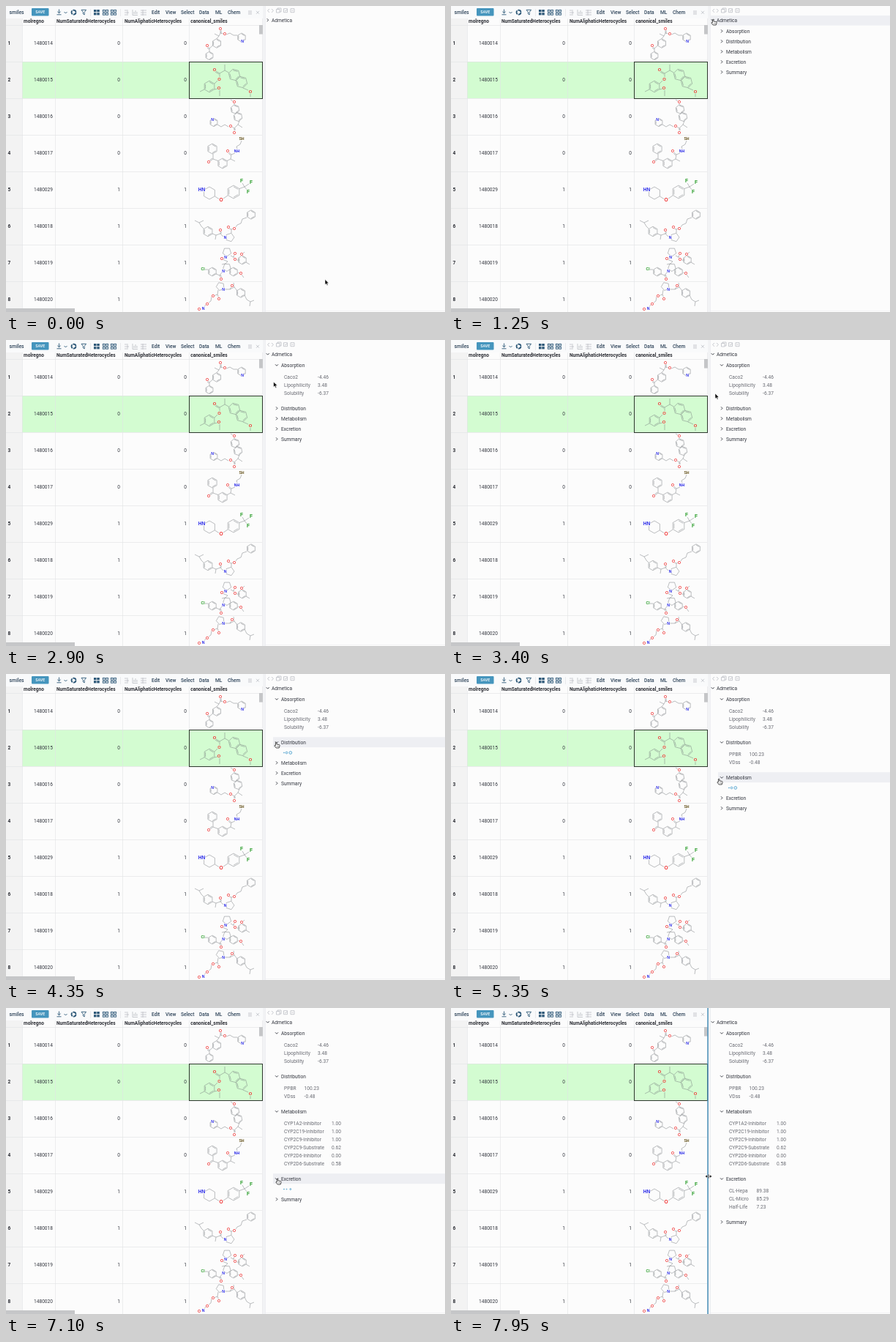
An HTML page that plays this animation: 600 px wide and 418 px high, repeating every 8000 ms.

```html
<!DOCTYPE html>
<html lang="en">
<head>
<meta charset="utf-8">
<title>Molecule table</title>
<style>
html, body { margin: 0; width: 100%; height: 100%; overflow: hidden; background: #fcfcfc; }
svg { display: block; width: 100vw; height: 100vh; }
text { font: 6.6px Roboto, "Open Sans", sans-serif; fill: #33363f; white-space: pre; }
.bold { font-weight: 700; font-size: 6.5px; fill: #2a2c33; }
.menu { font-weight: 500; fill: #2c4258; }
.title { font-size: 6.8px; }
.item { fill: #686a72; letter-spacing: .06px; }
.atom { font: bold 5.2px "Liberation Sans", Arial, sans-serif; text-anchor: middle; paint-order: stroke; stroke-width: 1.4; }
.end { text-anchor: end; }
.bond { fill: none; stroke: #6c7075; stroke-width: .45; stroke-linejoin: round; }
.icon { fill: none; stroke: #2d5878; stroke-width: .9; }
.faint { fill: none; stroke: #bbbec5; stroke-width: .8; }
.chevron { fill: none; stroke: #33363f; stroke-width: .9; }
</style>
</head>
<body>
<svg viewBox="0 0 600 418">
  <g id="table"></g>
  <g id="panel"></g>
  <g id="cursor"></g>
</svg>
<script>
const PAPER = '#fcfcfc', SELECTED = '#d3fcd1', LINE = '#e2e3e5';
const $ = id => document.getElementById(id);
const text = (x, y, s, cls = '') => `<text x="${x}" y="${y}" class="${cls}">${s}</text>`;
const rect = (x, y, w, h, fill, more = '') => `<rect x="${x}" y="${y}" width="${w}" height="${h}" fill="${fill}" ${more}/>`;
const path = (d, cls) => `<path d="${d}" class="${cls}"/>`;

const atomColors = { O: '#f03030', N: '#2828e8', HN: '#2828e8', NH: '#2828e8', F: '#249a24', Cl: '#249a24', SH: '#66531c' };

// Aromatic rings get a second line inside every other edge.
function ring([x, y, r, turn = 30, sides = 6, aromatic = sides === 6]) {
  const point = (i, k) => {
    const a = (turn + i * 360 / sides) * Math.PI / 180;
    return `${(x + k * Math.cos(a)).toFixed(1)},${(y + k * Math.sin(a)).toFixed(1)}`;
  };
  let d = 'M' + Array.from({ length: sides }, (_, i) => point(i, r)).join('L') + 'Z';
  if (aromatic) for (let i = 0; i < sides; i += 2) d += `M${point(i, r * .8)}L${point(i + 1, r * .8)}`;
  return d;
}

function molecule({ rings, bonds, atoms, size = 5.2 }, background) {
  const labels = atoms.split(';').map(a => {
    const [name, x, y] = a.trim().split(' ');
    return `<text class="atom" x="${x}" y="${+y + size * .36}" stroke="${background}" style="font-size:${size}px;fill:${atomColors[name]}">${name}</text>`;
  });
  return path(rings.map(ring).join('') + bonds, 'bond') + labels.join('');
}

const molecules = [
  { rings: [[278, 68, 5.7], [288, 51, 6.3], [322, 43, 6]],
    bonds: 'M278 62V58L282.5 54M278 58L276 56M277.3 59L275 57M288 44.7L291 41L285 38M291 41L293 37V33M294 37V33M293 37L297 38M301 39L306 37L311 40L316 40',
    atoms: 'O 275 54;O 293 31;O 299 38;N 323 48' },
  { rings: [[278, 110, 7.8], [312, 94, 8, 15], [322, 104, 8, 15]], size: 5.8,
    bonds: 'M271 114L265 117M285 114L289 113M292 115V123M285 106L289 102M292 97V92L287 89M291 93L286 90M292 92L299 88V80M299 88L304.5 91M324 112L331 115M334 120V124',
    atoms: 'O 285 87;O 291.5 99.5;O 291 112;O 334 117' },
  { rings: [[313, 141, 6.2, 20], [317, 151.5, 6.2, 20], [284, 159, 5.7]],
    bonds: 'M312 135V133M310 130L307 128M319 157L317 162L323 166M317 162L312 167V170M313 167V170M289 162L294 165L299 162L304 165M309 165L312 167',
    atoms: 'O 312 131;N 282 155;O 307 164;O 312 173' },
  { rings: [[282, 195, 7], [296, 215, 7]],
    bonds: 'M322 184L320 189L315 192L316 195M313 201L308 203L305 200M307 204L304 201M308 203L307 209L313 212M307 209L302 211.5M290 211.5L283 209V202M283 209L279 212M282 208L278 211',
    atoms: 'SH 322 181;NH 315.5 198.5;O 303 198.5;O 277 213' },
  { rings: [[278, 255.5, 8.5, 30, 6, false], [311, 254, 9]], size: 6.6,
    bonds: 'M285.4 260L291 263.5M297 263L303 259M319 249.5L326 247L323 242M326 247L332 243M326 247L330 252',
    atoms: 'HN 267.5 251;O 294 265;F 322 238.5;F 335 241;F 331 254' },
  { rings: [[276, 308, 6.8], [306, 316, 6, 0, 5, false], [335, 285, 6.2]],
    bonds: 'M258 293L264 296L270 293M264 296L267 301L270 304M282 311L287 313L286 319M287 313L293 311V308M294 311V308M293 311L297 315M308 310L308 305L305 304M308 305L311 304M314 302L316 299L321 297L323 291L329 289',
    atoms: 'O 293 306;N 299.5 316;O 304 302;O 312 304.5' },
  { rings: [[302, 336, 6, 90, 5, false], [323, 347, 6], [282, 363, 6], [302, 357, 5.5, 20, 5], [311, 363, 6]],
    bonds: 'M272 360L276 360M287 366L292 368L295 364M292 368L294 372M293 367L295 371M300 352L303 349L298 347M298 347L296 346M307 341L311 343L312 340M311 343L312 346M315 347L318 347M322 340L326 336M328 350L333 353M317 364L320 365M322 367L325 371M300 352L295 353',
    atoms: 'O 295 345.5;N 300 343.5;O 313 338.5;O 313 346;O 322 339;Cl 269 359;N 297 362;O 321 365;O 294 373' },
  { rings: [[293, 383, 5.7, 30, 5, false], [321, 392, 6.3]],
    bonds: 'M298 387L306 387L308 384M306 387L312 384L311 378M312 384L316 389M326 395L329 401L334 404L333 410M334 404L339 402M290 388L289 394L284 396M289 394L291 399M281 397L280 403L276 406M273 408L271 411',
    atoms: 'N 297 387;O 309 382;O 283 396.5;O 291 400;O 275 407;N 269.5 413.5;O 264 414' }
];

function drawTable() {
  const ids = [1480014, 1480015, 1480016, 1480017, 1480029, 1480018, 1480019, 1480020];
  const columns = [22, 67, 159, 250, 350];
  let out = rect(0, 0, 351, 17, '#f9fafb') + rect(0, 76, 350, 50, SELECTED) + rect(0, 17, 22, 401, '#f3f3f3');
  out += rect(0, 26, 350, .6, LINE);
  columns.forEach(x => out += rect(x, 17, .6, 401, LINE));
  ids.forEach((id, i) => {
    const y = 53.4 + 50 * i, count = i < 4 ? 0 : 1;
    out += rect(0, 76 + 50 * i, 350, .6, LINE) + text(2.5, y, i + 1, 'bold') +
      text(64, y, id, 'end') + text(156, y, count, 'end') + text(247, y, count, 'end') +
      molecule(molecules[i], i === 1 ? SELECTED : PAPER);
  });
  out += rect(250.5, 76.5, 100, 50, 'none', 'stroke="#2f382f" stroke-width="1"');
  out += text(24, 23.2, 'molregno', 'bold') + text(69, 23.2, 'NumSaturatedHeterocycles', 'bold') +
    text(162, 23.2, 'NumAliphaticHeterocycles', 'bold') + text(252.3, 23.2, 'canonical_smiles', 'bold');
  out += rect(346, 26, 5, 12.5, '#c5c6c8') + rect(0, 413, 94, 5, '#c5c6c8');
  return out + drawToolbar();
}

function drawToolbar() {
  let out = text(4.5, 10.8, 'smiles', 'bold menu title') + rect(35, 3, 23.5, 10.5, '#4595bd', 'rx="1"') +
    '<text x="46.8" y="10.4" text-anchor="middle" style="font-size:5.4px;font-weight:500;fill:#fff">SAVE</text>';
  out += path('M72.5 4.5V9.5M70.2 7.6L72.5 9.8L74.8 7.6M69.5 11.8H75.5M79.5 8L81.5 10L83.5 8', 'icon');
  out += '<circle cx="92.5" cy="8.6" r="3" class="icon" style="stroke-width:1.8" stroke-dasharray="5.3 1"/>';
  out += path('M103 5.3H109.6L107.2 8.4V12L105.4 10.8V8.4Z', 'icon');
  for (const dx of [-4, .3]) for (const dy of [5, 9.2]) {
    out += rect(124 + dx, dy, 3.5, 3.2, '#2d5878');
    for (const x of [136, 147]) out += rect(x + dx + .4, dy + .4, 2.8, 2.6, 'none', 'class="icon"');
  }
  out += rect(115, 4, .6, 10, '#dcdfe3') + rect(156, 4, .6, 10, '#dcdfe3');
  out += path('M162 6H165M162 9H168M162 12H165M166 5V13M173 5V12.5H180M175 11V8M177 11V6M179 11V8M184 6H192M184 9H192M184 12H192M187 5V13', 'faint');
  [['Edit', 199], ['View', 218], ['Select', 239], ['Data', 264], ['ML', 286], ['Chem', 303]]
    .forEach(([name, x]) => out += text(x, 11, name, 'menu'));
  return out + path('M331 7H336M331 9H336M331 11H336M342 6.8L346 10.8M346 6.8L342 10.8', 'faint');
}

const sections = [
  { name: 'Absorption', open: 2500, ready: 2700, valueX: 426,
    items: [['Caco2', '-4.46'], ['Lipophilicity', '3.48'], ['Solubility', '-6.37']] },
  { name: 'Distribution', open: 3950, ready: 4400, valueX: 407.5,
    items: [['PPBR', '100.23'], ['VDss', '-0.48']] },
  { name: 'Metabolism', open: 5100, ready: 6050, valueX: 445,
    items: [['CYP1A2-Inhibitor', '1.00'], ['CYP2C19-Inhibitor', '1.00'], ['CYP2C9-Inhibitor', '1.00'],
      ['CYP2C9-Substrate', '0.62'], ['CYP2D6-Inhibitor', '0.00'], ['CYP2D6-Substrate', '0.58']] },
  { name: 'Excretion', open: 6850, ready: 7750, valueX: 417.5,
    items: [['CL-Hepa', '89.38'], ['CL-Micro', '85.29'], ['Half-Life', '7.23']] },
  { name: 'Summary', open: Infinity, ready: Infinity, items: [] }
];
// Each entry: start time and highlighted row.
const hovers = [[0, ''], [400, 'Admetica'], [1750, 'Absorption'], [2900, ''], [3700, 'Distribution'],
  [4600, ''], [4800, 'Metabolism'], [5650, 'Excretion'], [7850, '']];
const RESIZE = 7850;
const latest = (list, t) => list.findLast(entry => entry[0] <= t);

const chevron = (x, y, open) => path(open ? `M${x - 2} ${y - 1}l2 2l2 -2` : `M${x - 1} ${y - 2}l2 2l-2 2`, 'chevron');

function loader(y, t) {
  return [380, 383.5, 388.8].map((x, i) => {
    const r = 1.1 + .8 * Math.sin(t / 160 + i * 1.1 - 34.2);
    return `<circle cx="${x}" cy="${y}" r="${Math.max(.5, r).toFixed(2)}" fill="#e9f5fc" stroke="#4a9cca" stroke-width=".8"/>`;
  }).join('');
}

function drawPanel(t) {
  const hover = latest(hovers, t)[1];
  let out = rect(351, 0, 3.5, 418, '#f2f3f5') + rect(354.3, 0, .5, 418, '#e4e6ea') + rect(354, 416.5, 246, .5, '#e8e9ec');
  if (t >= RESIZE) out += rect(350.3, 0, 1.5, 418, '#4a8fb9');
  else out += path('M360 4L357.5 6.4L360 8.8M363 4L365.5 6.4L363 8.8M369.5 4.5h4.5v4.5h-4.5zM371 4.5V3H376V8H374M379.5 3.7h5v5h-5zM380.8 6l1.2 1.2l2 -2.4M389 3.7h5v5h-5zM390.4 6.2h2.2', 'faint');
  if (hover === 'Admetica') out += rect(355, 13, 245, 13.5, '#eeeff3');
  out += chevron(357.7, 19.2, t >= 950) + text(363, 21.8, 'Admetica');
  if (t < 950) return out;

  let y = 34.5;
  for (const { name, open, ready, valueX, items } of sections) {
    if (hover === name) out += rect(365, y - 7.3, 235, 14, '#eeeff3');
    out += chevron(370, y - .2, t >= open) + text(376, y + 2.4, name);
    if (t >= ready) {
      items.forEach(([label, value], i) => {
        const base = y + 18.8 + 11 * i;
        out += text(380, base, label, 'item') + text(valueX, base, value, 'item');
      });
      y += 26 + 11 * items.length;
    } else if (t >= open) {
      out += loader(y + 14, t);
      y += 28;
    } else y += 14;
  }
  return out;
}

const jumps = [[0, 436, 373.5], [50, 430, 368], [200, 379, 68]];
const moves = [[400, 358, 18], [1500, 358, 18], [1850, 372.5, 37], [2650, 372.5, 37], [3000, 364, 62], [3300, 361, 73],
  [3450, 361, 73], [3750, 369, 93], [4450, 369, 93], [4800, 366, 143], [5450, 366, 143], [5750, 370, 170],
  [6150, 370, 170], [6500, 371, 233], [7600, 371, 233], [7850, 352, 230], [8000, 352, 230]];

function cursorAt(t) {
  if (t < 400) return latest(jumps, t).slice(1);
  const next = moves.findIndex(m => m[0] > t);
  const [t0, x0, y0] = moves[next - 1], [t1, x1, y1] = moves[next];
  const p = (t - t0) / (t1 - t0), k = p * p * (3 - 2 * p);
  return [x0 + (x1 - x0) * k, y0 + (y1 - y0) * k];
}

const shapes = {
  arrow: '<path d="M0 0V7.2L1.7 5.7L2.9 8.3L4.1 7.8L3 5.2H5.2Z" fill="#000" stroke="#fff" stroke-width=".6"/>',
  hand: '<path d="M-.6 .6Q.2 -.3 .9 .6V3L4.6 3.6Q5.3 4 5 5.4L4.2 8H.2L-2.2 5Q-2 3.9 -.6 4.7Z" fill="#fff" stroke="#222" stroke-width=".8"/><path d="M1.1 5V6.6M2.5 5V6.6M3.7 5V6.6" stroke="#333" stroke-width=".4"/>',
  resize: '<path d="M-4.5 0L-2 -2V-.6H2V-2L4.5 0L2 2V.6H-2V2ZM-.6 -2.8H.6V2.8H-.6Z" fill="#111" stroke="#fff" stroke-width=".3"/>'
};

function draw() {
  const t = performance.now() % 8000;
  const [x, y] = cursorAt(t);
  $('panel').innerHTML = drawPanel(t);
  $('cursor').innerHTML = shapes[t >= RESIZE ? 'resize' : latest(hovers, t)[1] ? 'hand' : 'arrow'];
  $('cursor').setAttribute('transform', `translate(${x.toFixed(2)} ${y.toFixed(2)})`);
  requestAnimationFrame(draw);
}

$('table').innerHTML = drawTable();
draw();
</script>
</body>
</html>
```
